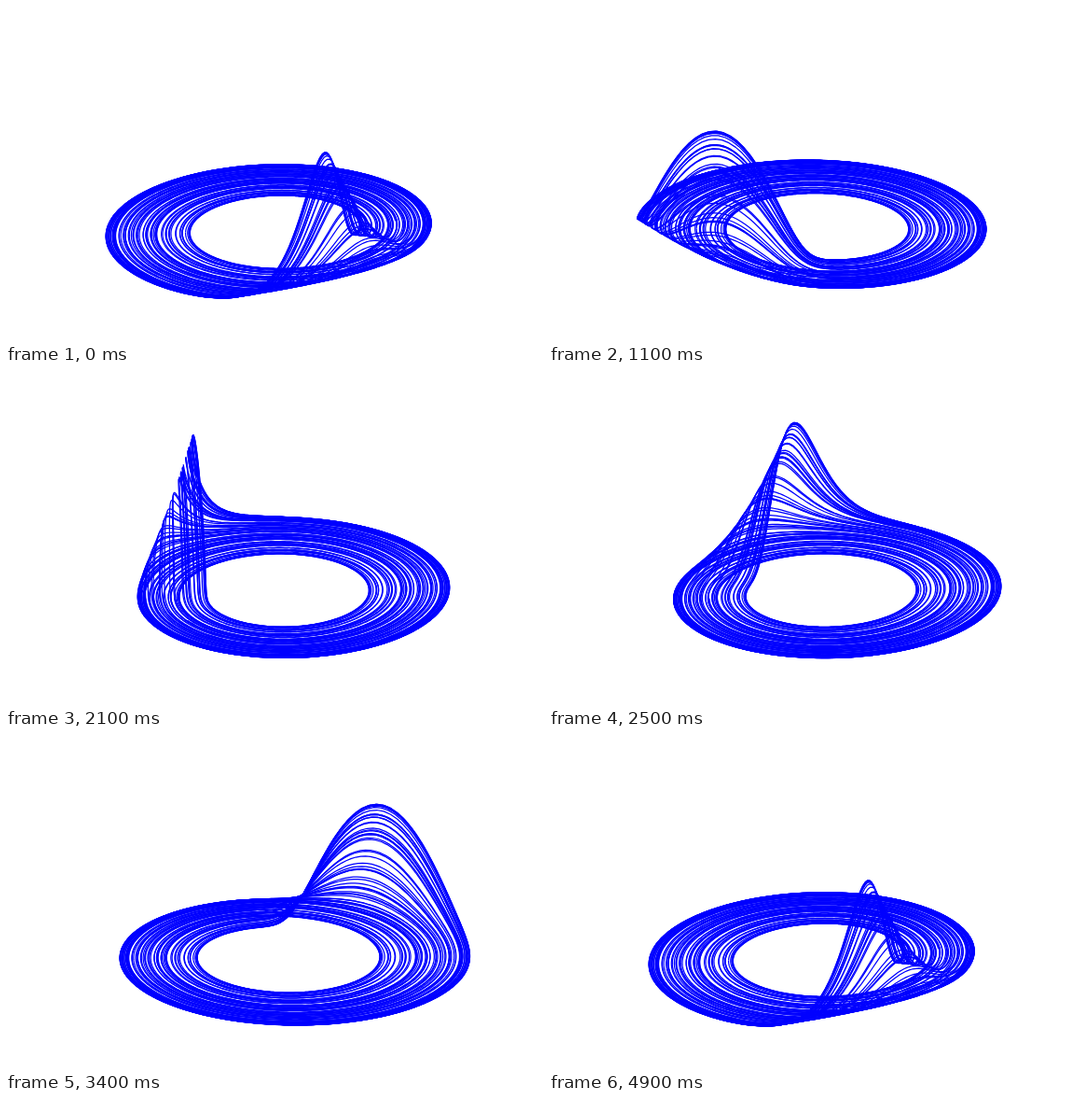
Recreate the animation shown at these times as an HTML page with a canvas. Size 576 by 360 pixels, loop 5 s.

```html
<!DOCTYPE html>
<html>
<head>
<meta charset="utf-8">
<title>Rössler attractor</title>
<style>
html, body { margin: 0; height: 100%; overflow: hidden; background: #fff; }
canvas { display: block; }
</style>
</head>
<body>
<canvas id="stage" width="576" height="360"></canvas>
<script>
const ctx = document.getElementById('stage').getContext('2d');
const A = 0.1, B = 0.1, C = 14;
const STEP = 0.01, SKIP = 10000, STEPS = 50000;
const FRAMES = 50, FRAME_MS = 100;

const flow = ([x, y, z]) => [-y - z, x + A * y, B + z * (x - C)];
const add = (p, v, h) => p.map((c, i) => c + v[i] * h);

function rk4(p, h) {
  const k1 = flow(p);
  const k2 = flow(add(p, k1, h / 2));
  const k3 = flow(add(p, k2, h / 2));
  const k4 = flow(add(p, k3, h));
  return p.map((c, i) => c + h / 6 * (k1[i] + 2 * k2[i] + 2 * k3[i] + k4[i]));
}

// Integrate past the transient and keep every second point.
const points = [];
let p = [1, 1, 1], yMin = 0, yMax = 0, zMax = 0;
for (let i = 0; i < SKIP + STEPS; i++) {
  p = rk4(p, STEP);
  if (i < SKIP || i % 2) continue;
  points.push(p);
  yMin = Math.min(yMin, p[1]);
  yMax = Math.max(yMax, p[1]);
  zMax = Math.max(zMax, p[2]);
}

// Orthographic view: pixels per unit across, in depth and upwards.
const across = 349 / (yMax - yMin);
const depth = across * 0.4;
const up = 130.3 / zMax;

function draw(frame) {
  const turn = 2 * Math.PI * frame / (FRAMES - 1);
  const cos = Math.cos(turn), sin = Math.sin(turn);
  ctx.clearRect(0, 0, 576, 360);
  ctx.save();
  ctx.beginPath();
  ctx.rect(72, 36, 446, 279);
  ctx.clip();
  ctx.strokeStyle = '#00f';
  ctx.lineWidth = 1.25;
  ctx.lineJoin = 'round';
  ctx.beginPath();
  points.forEach(([x, y, z], i) => {
    const px = 295.4 + across * (y * cos - x * sin);
    const py = 239.2 + depth * (x * cos + y * sin) - up * z;
    ctx.lineTo(px, py);
    // Short pieces stroke faster than one long path.
    if (i % 300 === 299) {
      ctx.stroke();
      ctx.beginPath();
      ctx.moveTo(px, py);
    }
  });
  ctx.stroke();
  ctx.restore();
}

let shown = -1;
function tick() {
  const frame = Math.floor(performance.now() / FRAME_MS) % FRAMES;
  if (frame !== shown) draw(shown = frame);
  requestAnimationFrame(tick);
}
tick();
</script>
</body>
</html>
```
